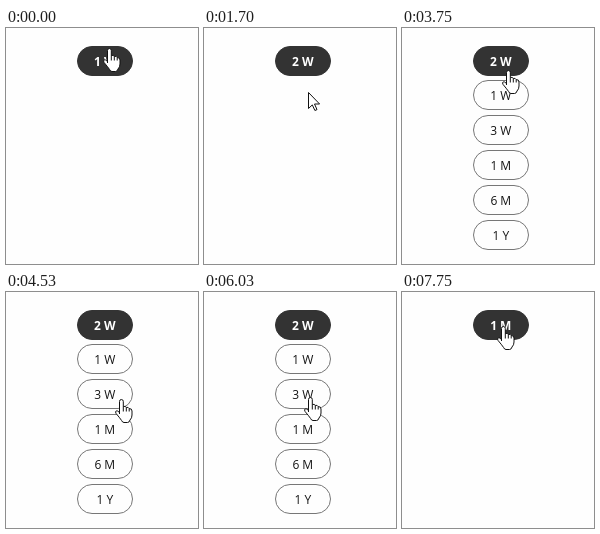
Animation of 192x236 px, one loop 8000 ms. Source, as an HTML page:

```html
<!DOCTYPE html>
<html lang="en">
<head>
<meta charset="utf-8">
<title>Period picker</title>
<style>
  html, body { margin: 0; width: 100%; height: 100%; overflow: hidden; background: #fefefe; }
  svg { display: block; width: 192px; height: 236px; }
  text { font: 12px "Open Sans", "Noto Sans", sans-serif; text-anchor: middle; fill: #151515; }
  .pill { fill: #fefefe; stroke: #777; }
  .head .pill { fill: #333; stroke: #333; }
  .head text { font-weight: 700; fill: #fff; }
  .cursor { fill: #fff; stroke: #111; stroke-linejoin: round; }
</style>
</head>
<body>
<svg viewBox="0 0 192 236">
  <g id="menu"></g>
  <path id="arrow" class="cursor" d="M.5 .5V16.5L4.3 12.9L6.9 18.5L9 17.6L6.5 12H11.6Z"/>
  <g id="hand" class="cursor">
    <path d="M4.5 15V2.5Q4.5 .5 6.4 .5T8.3 2.5V7.5Q10.5 6.8 11.3 8.4Q13.4 7.8 14.2 9.6Q17 9.4 17 12V16Q17 19 15 21Q14.4 23.5 12.5 23.5H9Q7.4 23.5 6.6 21.5Q4.5 18.5 1 14.4Q0 12.6 1.2 11.9Q2.6 11.3 4.5 13.6"/>
    <path fill="none" d="M8.3 7.5V12.5M11.3 8.4V12.5M14.2 9.6V12.5"/>
  </g>
</svg>
<script>
const LOOP = 8000, STEP = 126;
const LABELS = ["1 W", "2 W", "3 W", "1 M", "6 M", "1 Y"];
const TOP = 18, FIRST = 52, GAP = 35, HEIGHT = 30;

// the list opens, then a label is picked and it closes
const PICKS = [
  { open: 130, close: 1700, label: "2 W" },
  { open: 2870, close: 6980, label: "1 M" }
];

// each glide eases through its stops, given as step, x, y
const REST = [-1, 103, 20];
const GLIDES = [
  { start: 530, stops: [[2, 105, 58], [4, 104, 64]] },
  { start: 2070, stops: [[3, 104, 31]] },
  { start: 3750, stops: [[0, 106, 42], [6, 115, 107], [8, 115, 112], [14, 109, 150],
                         [18, 106, 105], [19, 105, 98], [22, 102, 136]] },
  { start: 7240, stops: [[1, 115, 0], [4, 101, 34]] }
];

const $ = id => document.getElementById(id);
const menu = $("menu"), arrow = $("arrow"), hand = $("hand");
const smooth = u => u * u * (3 - 2 * u);
const clamp = u => Math.max(0, Math.min(1, u));

const pill = (label, y, cls) =>
  `<g class="${cls}"><rect class="pill" x="71.5" y="${y + .5}" width="55" height="29" rx="14.5"/>` +
  `<text x="98.8" y="${y + 20}">${label}</text></g>`;

function menuAt(t) {
  let label = LABELS[0], open = false;
  for (const pick of PICKS) {
    if (t >= pick.open) open = t < pick.close;
    if (t >= pick.close) label = pick.label;
  }
  return { label, open };
}

function menuMarkup({ label, open }) {
  const rest = open ? LABELS.filter(other => other !== label) : [];
  return pill(label, TOP, "head") +
    rest.map((other, i) => pill(other, FIRST + i * GAP, "option")).join("");
}

function pointerAt(t) {
  let [, x, y] = REST;
  for (const { start, stops } of GLIDES) {
    if (t < start) break;
    const step = Math.floor((t - start) / STEP);
    let from = -1;
    for (const [to, endX, endY] of stops) {
      const u = smooth(clamp((step - from) / (to - from)));
      x += (endX - x) * u;
      y += (endY - y) * u;
      from = to;
    }
  }
  return [Math.round(x), Math.round(y)];
}

function overPill(y, open) {
  if (y >= TOP && y < TOP + HEIGHT) return true;
  const offset = y - FIRST;
  return open && offset >= 0 && offset % GAP < HEIGHT;
}

let shown = "";
function draw(t) {
  const state = menuAt(t);
  const markup = menuMarkup(state);
  if (markup !== shown) menu.innerHTML = shown = markup;

  const [x, y] = pointerAt(t);
  const over = overPill(y, state.open);
  hand.style.display = over ? "" : "none";
  arrow.style.display = over ? "none" : "";
  hand.setAttribute("transform", `translate(${x - 6} ${y})`);
  arrow.setAttribute("transform", `translate(${x} ${y})`);
}

const start = performance.now();
function tick() {
  draw((performance.now() - start) % LOOP);
  requestAnimationFrame(tick);
}
tick();
</script>
</body>
</html>
```
